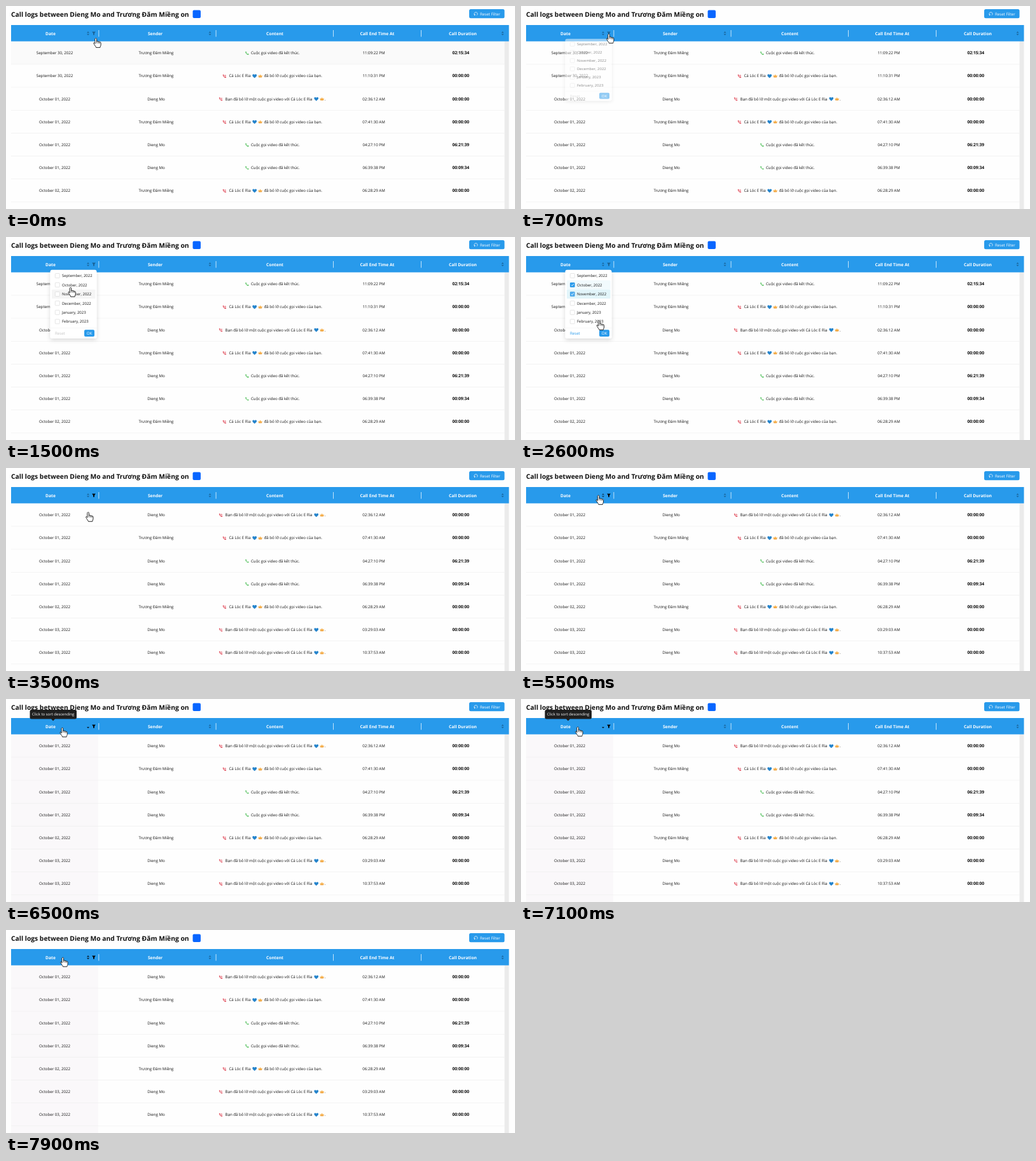
Animation, 800 px wide and 320 px high, one loop 8000 ms. Source, as an HTML page:

```html
<!DOCTYPE html>
<html lang="en">
<head>
<meta charset="utf-8">
<title>Call logs</title>
<style>
  html, body { margin: 0; width: 100%; height: 100%; overflow: hidden; background: #fefefe; }
  svg { display: block; width: 800px; height: 320px; }
  text {
    font: 6.15px "Open Sans", "Noto Sans", sans-serif; fill: #151515;
    white-space: pre; text-rendering: geometricPrecision;
  }
  .title { font-size: 10.3px; font-weight: 700; fill: #111; }
  .head { font-size: 6.7px; font-weight: 700; fill: #fff; }
  .bold { font-size: 6.7px; font-weight: 700; fill: #0a0a0a; }
  .small { font-size: 6px; }
  .mid { text-anchor: middle; }
  .white { fill: #fff; }
</style>
</head>
<body>
<svg id="stage" viewBox="0 0 800 320">
  <defs>
    <path id="phone" d="M7 3.5H3.5C3.5 13 11 20.5 20.5 20.5V16.5L16.5 15 14 17.3C11 16 8 13 6.8 10L9 7.8Z"/>
    <g id="ended" fill="#3fb84a" stroke="#3fb84a" stroke-width="1" transform="scale(.28)"><use href="#phone"/></g>
    <g id="missed" fill="#dc3545" transform="scale(.28)">
      <use href="#phone" stroke="#dc3545" stroke-width="1"/>
      <path d="M21.5 8.5H13M16.5 4.5L12.5 8.5L16.5 12.5" fill="none" stroke="#dc3545" stroke-width="2.2"/>
    </g>
    <path id="heart" fill="#2584cc" d="M3.4 6.1C1.7 4.8 0 3.5 0 1.8C0 .1 2.5-.4 3.4 1.2C4.3-.4 6.8 .1 6.8 1.8C6.8 3.5 5.1 4.8 3.4 6.1Z"/>
    <g id="crown">
      <path fill="#f6b04c" d="M.9 5.4L.1 2L1.9 3L3.4 .7L4.9 3L6.7 2L5.9 5.4Z"/>
      <path stroke="#e3983c" stroke-width=".6" d="M1.1 5H5.7"/>
    </g>
    <path id="up" d="M-2 0L0-2.3L2 0Z"/>
    <path id="down" d="M-2 0L0 2.3L2 0Z"/>
    <filter id="shadow" x="-20%" y="-20%" width="140%" height="150%">
      <feDropShadow dx="0" dy="2" stdDeviation="3" flood-opacity=".16"/>
    </filter>
  </defs>
  <g id="page"></g>
  <g id="allRows"></g>
  <g id="filteredRows"></g>
  <g id="header"></g>
  <g id="menu"></g>
  <g id="tooltip">
    <path fill="#1f1f1f" d="M40 17H108.500Q111 17 111 19.500V29Q111 31.500 108.500 31.500H77L74 34.500L71 31.500H40Q37.500 31.500 37.500 29V19.500Q37.500 17 40 17Z"/>
    <text class="mid white small" x="74.200" y="26.400">Click to sort descending</text>
  </g>
  <g id="cursor" stroke="#111" stroke-width=".9" stroke-linejoin="round" stroke-linecap="round">
    <path fill="#fff" d="M-1.4 1.3C-1.4-.4 1.2-.4 1.2 1.3V5.2C1.4 4.4 3.6 4.5 3.6 5.8C4 5 5.8 5.200 5.8 6.500C6.2 5.8 7.8 6 7.8 7.400V10.200C7.8 12 6.8 12.600 6.600 14.600H.2C0 13-1.6 11.800-2.600 9.800C-3.200 8.600-4 8-3.400 7.200C-2.600 6.400-1.600 7.600-1.400 8.200Z"/>
    <path fill="none" d="M1.2 5.2V7.600M3.600 5.8V8M5.8 6.500V8.300" stroke-width=".7"/>
  </g>
</svg>
<script>
const LOOP = 8000, STEP = 100, BLUE = '#289aeb';
const ROW_TOP = 55.8, ROW_H = 36.17, ITEM_TOP = 53.8, ITEM_H = 14.45;
const ANN = 'Dieng Mo', BEN = 'Trương Đăm Miềng', NICK = 'Cá Lóc E Rìa';
const $ = id => document.getElementById(id);

const text = (x, y, value, cls = '') => `<text x="${x}" y="${y}" class="${cls}">${value}</text>`;
const rect = (x, y, w, h, fill, more = '') =>
  `<rect x="${x}" y="${y}" width="${w}" height="${h}" fill="${fill}" ${more}/>`;
const use = (id, x, y, more = '') => `<use href="#${id}" x="${x}" y="${y}" ${more}/>`;
const icon = (id, x, y) => `<g transform="translate(${x} ${y})">${use(id, 0, 0)}</g>`;

// Each call: date, sender, kind, end time, duration
const calls = [
  ['September 30, 2022', BEN, 'ended', '11:09:22 PM', '02:15:34'],
  ['September 30, 2022', BEN, 'missedByYou', '11:10:31 PM'],
  ['October 01, 2022', ANN, 'missedByThem', '02:36:12 AM'],
  ['October 01, 2022', BEN, 'missedByYou', '07:41:30 AM'],
  ['October 01, 2022', ANN, 'ended', '04:27:10 PM', '06:21:39'],
  ['October 01, 2022', ANN, 'ended', '06:39:38 PM', '00:09:34'],
  ['October 02, 2022', BEN, 'missedByYou', '06:28:29 AM'],
  ['October 03, 2022', ANN, 'missedByThem', '03:29:03 AM'],
  ['October 03, 2022', ANN, 'missedByThem', '10:37:53 AM']
];

const emoji = (x, y) => icon('heart', x, y - 2.7) + icon('crown', x + 8.900, y - 3);
const content = {
  ended: (y, base) => icon('ended', 375.5, y - 2.9) + text(385, base, 'Cuộc gọi video đã kết thúc.'),
  missedByYou: (y, base) => icon('missed', 340, y - 2.9) + text(350.5, base, NICK) +
    emoji(387.300, y) + text(405.5, base, 'đã bỏ lỡ cuộc gọi video của bạn.'),
  missedByThem: (y, base) => icon('missed', 334.200, y - 2.9) +
    text(344.5, base, 'Bạn đã bỏ lỡ một cuộc gọi video với ' + NICK) +
    emoji(484.300, y) + text(500.5, base, '.')
};

function drawRow([date, sender, kind, end, duration = '00:00:00'], i) {
  const y = ROW_TOP + ROW_H * (i + .5), base = y + 2.3;
  return text(76.5, base, date, 'mid') + text(236, base, sender, 'mid') +
    content[kind](y, base) + text(578, base, end, 'mid') + text(714.800, base, duration, 'mid bold');
}

const borders = Array.from({ length: 8 }, (_, i) =>
  rect(8, ROW_TOP + ROW_H * (i + 1) - .4, 775.5, .6, '#ececec')).join('');

$('page').innerHTML =
  text(8, 17, `Call logs between ${ANN} and ${BEN} on`, 'title') +
  rect(293.5, 6.5, 12.5, 12.5, '#0866ff', 'rx="2"') +
  rect(728, 5, 55.5, 14.300, BLUE, 'rx="2.5"') +
  `<path d="M736.600 14.200A2.600 2.600 0 1 1 740 14.600" fill="none" stroke="#fff" stroke-width=".7"/>
   <path d="M735.600 13.300L738 13.500L736.400 15.300Z" fill="#fff"/>` +
  text(745, 14.500, 'Reset Filter', 'white') +
  rect(8, ROW_TOP, 775.5, ROW_H, '#fafafa', 'id="rowHover"') +
  rect(8, ROW_TOP, 137, 265, '#faf8fa', 'id="sortedColumn"') +
  borders + rect(783.5, ROW_TOP, 7, 265, '#ebebeb');

$('allRows').innerHTML = calls.slice(0, 7).map(drawRow).join('');
$('filteredRows').innerHTML = calls.slice(2).map(drawRow).join('');

const heads = [[70, 'Date'], [234.5, 'Sender'], [422.5, 'Content'], [583.5, 'Call End Time At'], [718, 'Call Duration']];
const carets = x => use('up', x, 42.400) + use('down', x, 44);
$('header').innerHTML = rect(8, 30, 782.5, 25.7, BLUE) +
  heads.map(([x, label]) => text(x, 45.600, label, 'mid head')).join('') +
  [145.4, 329.6, 514, 652].map(x => rect(x, 38, .9, 10.5, '#d5ebfc')).join('') +
  `<g fill="#000" fill-opacity=".32">${carets(320.5)}${carets(780.5)}</g>
   <g id="dateCarets" fill="#000">${use('up', 129, 42.400, 'id="ascending"')}${use('down', 129, 44)}</g>
   <path id="funnel" d="M135.200 40.600H140.800L138.900 43.300V45.700H137.100V43.300Z"/>`;

const months = ['September, 2022', 'October, 2022', 'November, 2022', 'December, 2022', 'January, 2023', 'February, 2023'];
const checkedAt = { 1: 1800, 2: 2350 };
const drawItem = (label, i) => {
  const y = ITEM_TOP + ITEM_H * (i + .5);
  return rect(72, y - 7.2, 68.5, 14.4, '#fff', `rx="1.5" id="item${i}"`) +
    rect(77.3, y - 3.5, 7, 7, '#fff', 'rx="1" stroke="#d4d4d4" stroke-width=".6"') +
    `<g id="check${i}">${rect(77, y - 3.8, 7.6, 7.6, BLUE, 'rx="1.2"')}
      <path d="M79 ${y}l1.400 1.500L82.800 ${y - 1.6}" fill="none" stroke="#fff" stroke-width=".9"/></g>` +
    text(88, y + 2.2, label, 'small');
};
$('menu').innerHTML =
  rect(69.5, 51.8, 73, 108.200, '#fff', 'rx="3" filter="url(#shadow)"') +
  months.map(drawItem).join('') +
  rect(69.5, 143, 73, .5, '#eee') +
  `<g id="reset">${text(77, 153.900, 'Reset')}</g>` +
  rect(123, 146.200, 16, 10.800, BLUE, 'rx="2"') + text(131, 153.900, 'OK', 'mid white');

// Cursor tip: time, x, y
const path = [
  [0, 141.3, 50.8], [400, 138.5, 44], [800, 138, 44], [1250, 103, 89], [1500, 101.5, 79.5],
  [1800, 101, 75], [2000, 101, 88], [2400, 102, 89], [2600, 122.7, 131.8], [2800, 131, 150],
  [3050, 131, 150], [3600, 129, 62], [4200, 127, 44.6], [5000, 125, 43.5], [5500, 121.7, 43],
  [5900, 91, 45], [6500, 88.5, 45.2], [7200, 89.3, 44], [7900, 89.3, 43.2], [8000, 89.3, 43.2]
];
const clamp = v => Math.max(0, Math.min(1, v));
const ramp = (t, start, length) => clamp((t - start) / length);

function tipAt(t) {
  const i = Math.max(1, path.findIndex(p => p[0] >= t));
  const [t0, x0, y0] = path[i - 1], [t1, x1, y1] = path[i];
  const k = ramp(t, t0, t1 - t0), e = k * k * (3 - 2 * k);
  return [x0 + (x1 - x0) * e, y0 + (y1 - y0) * e];
}

const set = (id, attrs) => { for (const name in attrs) $(id).setAttribute(name, attrs[name]); };
const show = (id, on) => set(id, { opacity: +on });

function render(t) {
  set('cursor', { transform: `translate(${tipAt(t)})` });

  const filtered = t >= 3000;
  show('allRows', !filtered);
  show('filteredRows', filtered);
  show('rowHover', 1 - ramp(t, 200, 300));
  set('funnel', { 'fill-opacity': filtered ? 1 : .36 });

  const open = ramp(t, 600, 200) * (1 - ramp(t, 2900, 200)), scale = .8 + .2 * open;
  set('menu', { opacity: open, transform: `translate(0 ${51.8 * (1 - scale)}) scale(1 ${scale})` });
  // The highlight trails the pointer because its colour fades in and out
  const hovered = Math.floor((tipAt(Math.max(0, t - 200))[1] - ITEM_TOP) / ITEM_H);
  months.forEach((_, i) => {
    const checked = t >= checkedAt[i], hover = i === hovered;
    set('item' + i, { fill: checked ? (hover ? '#e2f5fa' : '#f1fafd') : hover ? '#f5f5f5' : '#fff' });
    show('check' + i, checked ? ramp(t, checkedAt[i], 300) : 0);
  });
  $('reset').firstChild.style.fill = t >= checkedAt[1] ? BLUE : '#c4c4c4';

  show('sortedColumn', ramp(t, 6000, 200));
  show('ascending', t < 6000 || t >= 7800);
  set('dateCarets', { 'fill-opacity': t < 4000 ? .32 : t < 6000 ? .55 : .8 });
  show('tooltip', ramp(t, 6000, 200) * (1 - ramp(t, 7600, 200)));
}

const start = performance.now();
function frame() {
  const t = (performance.now() - start) % LOOP;
  render(Math.floor(t / STEP) * STEP);
  requestAnimationFrame(frame);
}
frame();
</script>
</body>
</html>
```
